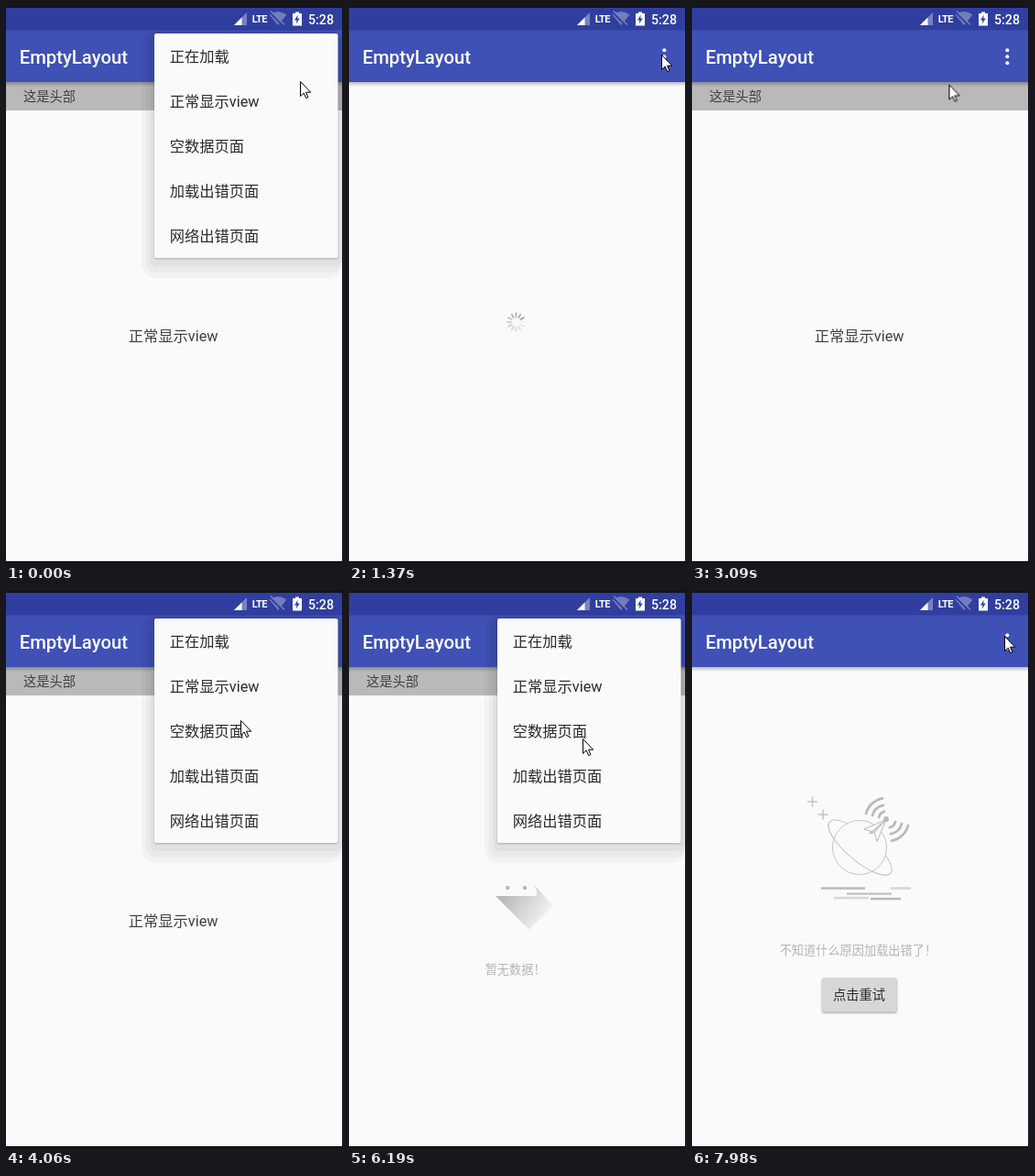
Recreate the animation shown at these times as an HTML page. Size 368x608 px, loop 8000 ms.

```html
<!DOCTYPE html>
<html lang="zh-CN">
<head>
<meta charset="utf-8">
<title>EmptyLayout</title>
<style>
html, body { margin: 0; width: 100%; height: 100%; overflow: hidden; background: #fafafa; }
svg { display: block; width: 368px; height: 608px; }
text { font: 16.3px Roboto, "Noto Sans CJK SC", "Noto Sans CJK", sans-serif; fill: #2b2b2b; }
.title { font-size: 20.3px; font-weight: 500; fill: #fff; }
.clock { font-size: 14.2px; font-weight: 500; fill: #fff; }
.net { font-size: 11px; font-weight: 700; font-stretch: 75%; fill: #fff; letter-spacing: -.5px; }
.label { font-size: 14.25px; }
.hint { font-size: 13.2px; fill: #b4b4b4; }
#header text, #normal { fill: #404040; }

#header, #normal, #loading, #empty, #error, #menu { animation: 8s step-end infinite; }
#header { animation-name: header; }
#normal { animation-name: normal; }
#loading { animation-name: loading; }
#empty { animation-name: empty; }
#error { animation-name: error; }
#menu { animation-name: menu; }
#spinner { animation: spin 8s linear infinite; }
#cursor { animation: cursor 8s linear infinite; }

@keyframes header { 0%, 34.125% { opacity: 1 } 8.75%, 89.125%, 100% { opacity: 0 } }
@keyframes normal { 0%, 34.125% { opacity: 1 } 8.75%, 59%, 100% { opacity: 0 } }
@keyframes loading { 0%, 34.125%, 100% { opacity: 0 } 8.75% { opacity: 1 } }
@keyframes empty { 0%, 89.125%, 100% { opacity: 0 } 59% { opacity: 1 } }
@keyframes error { 0% { opacity: 0 } 89.125%, 100% { opacity: 1 } }
@keyframes menu {
  0%, 24%, 47.375%, 74.125% { opacity: 1 }
  8.75%, 34.125%, 59%, 89.125% { opacity: .5 }
  10.625%, 35.625%, 60.875%, 90.75%, 100% { opacity: 0 }
  22.5%, 45.5%, 72.25% { opacity: .6 }
}
@keyframes spin {
  0% { transform: rotate(-60deg) }
  8.75% { transform: rotate(-60deg); animation-timing-function: steps(14) }
  35%, 100% { transform: rotate(360deg) }
}
@keyframes cursor {
  0% { transform: translate(321px, 82px) }
  1.875% { transform: translate(321px, 82px); animation-timing-function: steps(3, jump-start) }
  6.375% { transform: translate(239px, 51px) }
  10.625% { transform: translate(239px, 51px); animation-timing-function: steps(5, jump-start) }
  18.75% { transform: translate(341px, 53px) }
  24% { transform: translate(341px, 53px); animation-timing-function: steps(4, jump-start) }
  30.5% { transform: translate(240px, 108px) }
  35.625% { transform: translate(240px, 108px); animation-timing-function: steps(5, jump-start) }
  43.6% { transform: translate(341px, 52px) }
  47.5% { transform: translate(341px, 52px); animation-timing-function: steps(3, jump-start) }
  52.375% { transform: translate(256px, 141px); animation-timing-function: steps(3, jump-start) }
  57.25% { transform: translate(252px, 155px) }
  60.875% { transform: translate(252px, 155px); animation-timing-function: steps(5, jump-start) }
  68.525% { transform: translate(341px, 49px) }
  74.125% { transform: translate(341px, 49px); animation-timing-function: steps(3, jump-start) }
  79% { transform: translate(255px, 161px) }
  79.25% { transform: translate(255px, 161px); animation-timing-function: steps(4, jump-start) }
  85.75% { transform: translate(252px, 203px) }
  90.75% { transform: translate(252px, 203px); animation-timing-function: steps(4, jump-start) }
  97.75% { transform: translate(340px, 46px); animation-timing-function: step-end }
  99.75%, 100% { transform: translate(341px, 49px) }
}
</style>
</head>
<body>
<svg viewBox="0 0 368 608">
  <defs>
    <filter id="tight" x="-20%" y="-20%" width="140%" height="140%"><feGaussianBlur stdDeviation="1.3"/></filter>
    <linearGradient id="barShade" x2="0" y2="1">
      <stop stop-opacity=".25"/><stop offset="1" stop-opacity="0"/>
    </linearGradient>
    <linearGradient id="fold" gradientUnits="userSpaceOnUse" x1="172" y1="330" x2="212" y2="358">
      <stop stop-color="#b9b9b9"/><stop offset="1" stop-color="#f0f0f0"/>
    </linearGradient>
    <path id="waves" d="M-22-6A23 23 0 0 1-4-22.6M-15-4A15.5 15.5 0 0 1-3-15.2M-8-2A8.5 8.5 0 0 1-2-8.2"
      fill="none" stroke="#b9b9b9" stroke-width="2.8" stroke-linecap="round"/>
  </defs>

  <rect width="368" height="608" fill="#fafafa"/>

  <g id="header">
    <rect y="83" width="367" height="31" fill="#b9b9b9"/>
    <text class="label" x="19" y="104.4">这是头部</text>
  </g>

  <text id="normal" x="133.7" y="366">正常显示view</text>

  <g id="loading"><g transform="translate(182.5 345)"><g id="spinner"></g></g></g>

  <g id="empty">
    <path d="M160 333H204.5L205.5 329L202.5 321L223 344L196.5 369.5Z" fill="url(#fold)"/>
    <g fill="#b9b9b9"><circle cx="173.3" cy="324" r="2.2"/><circle cx="192" cy="324" r="2.2"/></g>
    <text class="hint" x="148.7" y="418">暂无数据！</text>
  </g>

  <g id="error">
    <g fill="none" stroke="#c4c4c4">
      <path d="M126 230h11M131.5 224.5v11M137.5 244h11M143 238.5v11" stroke-width="1.5"/>
      <ellipse cx="183.5" cy="280" rx="43.5" ry="14.5" transform="rotate(40 183.5 280)"/>
      <circle cx="183" cy="280" r="29.5" fill="#fafafa"/>
      <path d="M-43.5 0A43.5 14.5 0 0 0 43.5 0" transform="translate(183.5 280) rotate(40)"/>
      <path d="M188 260L212 249.5L202 273.5L199 263.5Z" fill="#fafafa" stroke="#b9b9b9"/>
      <path d="M199 263.5L212 249.5L193.5 265L199 263.5" fill="#d8d8d8" stroke="#b9b9b9"/>
    </g>
    <circle cx="212" cy="249" r="3" fill="#b9b9b9"/>
    <use href="#waves" transform="translate(212 249)"/>
    <use href="#waves" transform="translate(214 250) rotate(180)"/>
    <g stroke="#b9b9b9" stroke-width="2.5">
      <path d="M141 324.5h48M195 336h33"/>
      <path d="M169 330.5h49" stroke-width="2"/>
      <path d="M217 324.5h22M155 335h38" stroke="#d6d6d6"/>
    </g>
    <text class="hint" x="95.7" y="397">不知道什么原因加载出错了！</text>
    <rect x="142" y="423.5" width="81.5" height="37" rx="2" opacity=".4" filter="url(#tight)"/>
    <rect x="142" y="422" width="81.5" height="37.5" rx="2" fill="#d6d7d7"/>
    <text class="label" x="154" y="446.4">点击重试</text>
  </g>

  <rect y="83" width="367" height="5" fill="url(#barShade)"/>
  <rect y="26" width="367" height="57" fill="#3f51b5"/>
  <rect width="367" height="26.4" fill="#303f9f"/>
  <text class="title" x="14.7" y="62.8">EmptyLayout</text>
  <g fill="#fff">
    <circle cx="344.3" cy="48.3" r="2"/><circle cx="344.3" cy="55.3" r="2"/><circle cx="344.3" cy="62.3" r="2"/>
    <path d="M249 21L263 7V21Z" opacity=".35"/>
    <path d="M249 21L257.5 12.5V21Z"/>
    <path d="M287.5 9.5Q297 2.5 306.5 9.5L297 21Z" opacity=".32"/>
    <path d="M316 6.5h4v1.5h3v13.5h-10V8h3Z"/>
  </g>
  <path d="M288 7L304 23" stroke="#303f9f" stroke-width="2"/>
  <path d="M289 5.5L304 20.5" stroke="#7781bf" stroke-width="1.5"/>
  <path d="M318.7 9.5L315 15.5H317.4L316.9 19.5L320.7 13.5H318.2Z" fill="#303f9f"/>
  <text class="net" x="268.7" y="18">LTE</text>
  <text class="clock" x="330" y="19.7">5:28</text>

  <g id="menu">
    <g opacity=".03">
      <rect x="148" y="24" width="219" height="273" rx="16"/>
    </g>
    <g opacity=".03">
      <rect x="153" y="27" width="214" height="264" rx="11"/>
    </g>
    <g opacity=".04">
      <rect x="157.500" y="29" width="209.500" height="255" rx="7"/>
    </g>
    <rect x="162" y="31" width="200.5" height="245" rx="2" opacity=".25" filter="url(#tight)"/>
    <rect x="162" y="30" width="200.5" height="245" rx="2" fill="#fafafa"/>
    <g id="items"></g>
  </g>

  <path d="M0 1H368M0 607H368" stroke="#11131c" stroke-width="2"/>
  <path d="M367.5 0V608" stroke="#11131c"/>

  <path id="cursor" d="M.5.5V16.5L4.2 13L6.7 18.6L8.9 17.6L6.5 12.2H11.7Z" fill="#fff" stroke="#000" stroke-linejoin="round"/>
</svg>
<script>
const add = (parent, tag, attrs, label = '') => {
  const el = document.createElementNS('http://www.w3.org/2000/svg', tag);
  for (const key in attrs) el.setAttribute(key, attrs[key]);
  el.textContent = label;
  document.getElementById(parent).append(el);
};

['正在加载', '正常显示view', '空数据页面', '加载出错页面', '网络出错页面'].forEach((label, i) =>
  add('items', 'text', { x: 178.7, y: 61 + i * 49 }, label));

// The leading tick is darkest; the rest fade out behind it.
for (let i = 0; i < 12; i++) {
  const grey = 135 + i * 9;
  add('spinner', 'path', {
    d: 'M0-5.5V-9.8',
    transform: `rotate(${-30 * i})`,
    stroke: `rgb(${grey},${grey},${grey})`,
    'stroke-width': 1.4,
    'stroke-linecap': 'round'
  });
}
</script>
</body>
</html>
```
